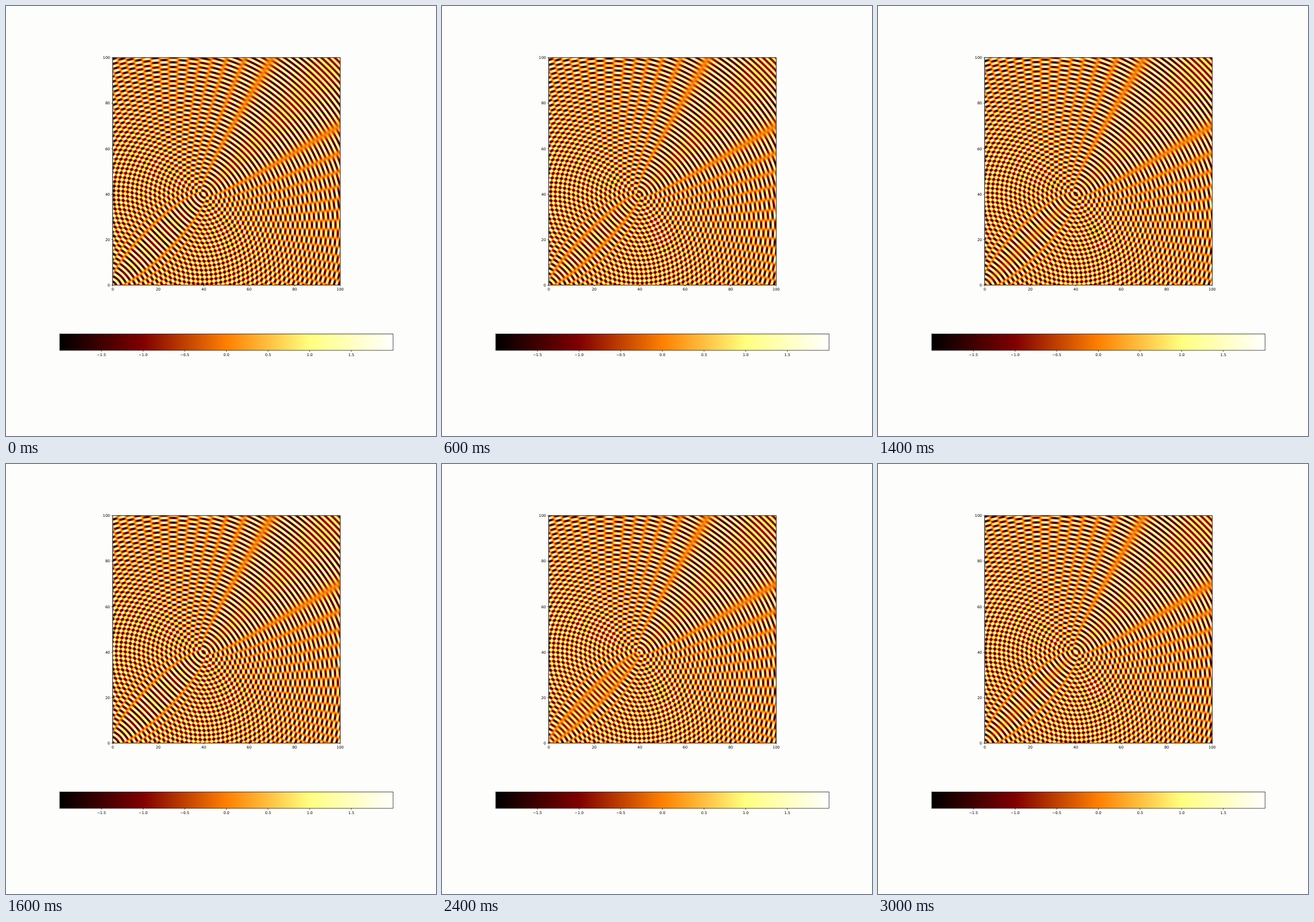
Animation, 748 px wide and 748 px high, one loop 3200 ms. Source, as an HTML page with a canvas:

```html
<!DOCTYPE html>
<html lang="en">
<head>
<meta charset="utf-8">
<title>Two-source wave interference</title>
<style>
  html, body { margin: 0; width: 100%; height: 100%; overflow: hidden; background: #fdfdfc; }
  canvas { display: block; }
</style>
</head>
<body>
<canvas id="stage" width="748" height="748"></canvas>
<script>
const ctx = document.getElementById('stage').getContext('2d');

const LEFT = 185.7, BOTTOM = 485.4, SIDE = 395.5, UNIT = SIDE / 100;
const BAR = { x: 93.6, y: 570.4, w: 579.6, h: 28.6 };
const K = Math.PI;          // wave number: wavelength of 2 units
const STEP_MS = 200, STEPS = 16;
const STEP = 2 * Math.PI / STEPS;
const LIMIT = 2;            // colour range is -LIMIT..LIMIT

// Black, red, orange, yellow, white ramp
const channel = v => Math.round(255 * Math.min(1, Math.max(0, v)));
const heat = u => [channel(2 * u), channel(2 * u - 0.5), channel(2 * u - 1)];
const palette = new Uint32Array(256);
for (let i = 0; i < 256; i++) {
  const [r, g, b] = heat(i / 255);
  palette[i] = (255 << 24 | b << 16 | g << 8 | r) >>> 0;
}

// The sum of two sines is an amplitude times a moving sine
const N = 396, X0 = 186, Y0 = 90;
const image = ctx.createImageData(N, N);
const pixels = new Uint32Array(image.data.buffer);
const amp = new Float32Array(N * N), phase = new Float32Array(N * N);
for (let j = 0, p = 0; j < N; j++) {
  const y = (BOTTOM - Y0 - j - 0.5) / UNIT;
  for (let i = 0; i < N; i++, p++) {
    const x = (X0 + i + 0.5 - LEFT) / UNIT;
    const a = Math.hypot(x, y), b = Math.hypot(x - 40, y - 40);
    amp[p] = 2 * Math.cos(K * (a - b) / 2);
    phase[p] = K * (a + b) / 2;
  }
}

function line(x1, y1, x2, y2) {
  ctx.beginPath();
  ctx.moveTo(x1, y1);
  ctx.lineTo(x2, y2);
  ctx.stroke();
}

function tickBelow(x, y, label) {
  line(x, y, x, y + 2.4);
  ctx.textAlign = 'center';
  ctx.fillText(label, x, y + 9.5);
}

function drawFrame() {
  ctx.strokeStyle = ctx.fillStyle = '#000';
  ctx.lineWidth = 0.7;
  ctx.font = '6.5px "DejaVu Sans", sans-serif';
  ctx.strokeRect(LEFT, BOTTOM - SIDE, SIDE, SIDE);
}

function drawStatic() {
  ctx.fillStyle = '#fdfdfc';
  ctx.fillRect(0, 0, 748, 748);

  const ramp = ctx.createLinearGradient(BAR.x, 0, BAR.x + BAR.w, 0);
  for (let i = 0; i <= 4; i++) ramp.addColorStop(i / 4, `rgb(${heat(i / 4)})`);
  ctx.fillStyle = ramp;
  ctx.fillRect(BAR.x, BAR.y, BAR.w, BAR.h);

  drawFrame();
  ctx.strokeRect(BAR.x, BAR.y, BAR.w, BAR.h);
  for (let v = 0; v <= 100; v += 20) {
    tickBelow(LEFT + v * UNIT, BOTTOM, v);
    const y = BOTTOM - v * UNIT;
    line(LEFT - 2.4, y, LEFT, y);
    ctx.textAlign = 'right';
    ctx.fillText(v, LEFT - 4.7, y + 2.4);
  }
  for (let v = -1.5; v <= 1.5; v += 0.5) {
    const x = BAR.x + BAR.w * (v + LIMIT) / (2 * LIMIT);
    tickBelow(x, BAR.y + BAR.h, v.toFixed(1).replace('-', '\u2212'));
  }
}

function drawWaves(step) {
  const shift = step * STEP, scale = 127.5 / LIMIT;
  for (let p = 0; p < pixels.length; p++) {
    const level = 128 + scale * amp[p] * Math.sin(phase[p] + shift);
    pixels[p] = palette[Math.max(0, Math.min(255, level | 0))];
  }
  ctx.putImageData(image, X0, Y0, 0, 0, 395, 395);
  drawFrame();
}

let shown = -1;
const start = performance.now();
function tick() {
  const step = Math.floor((performance.now() - start) / STEP_MS) % STEPS;
  if (step !== shown) {
    drawStatic();
    drawWaves(step);
    shown = step;
  }
  requestAnimationFrame(tick);
}
tick();
</script>
</body>
</html>
```
